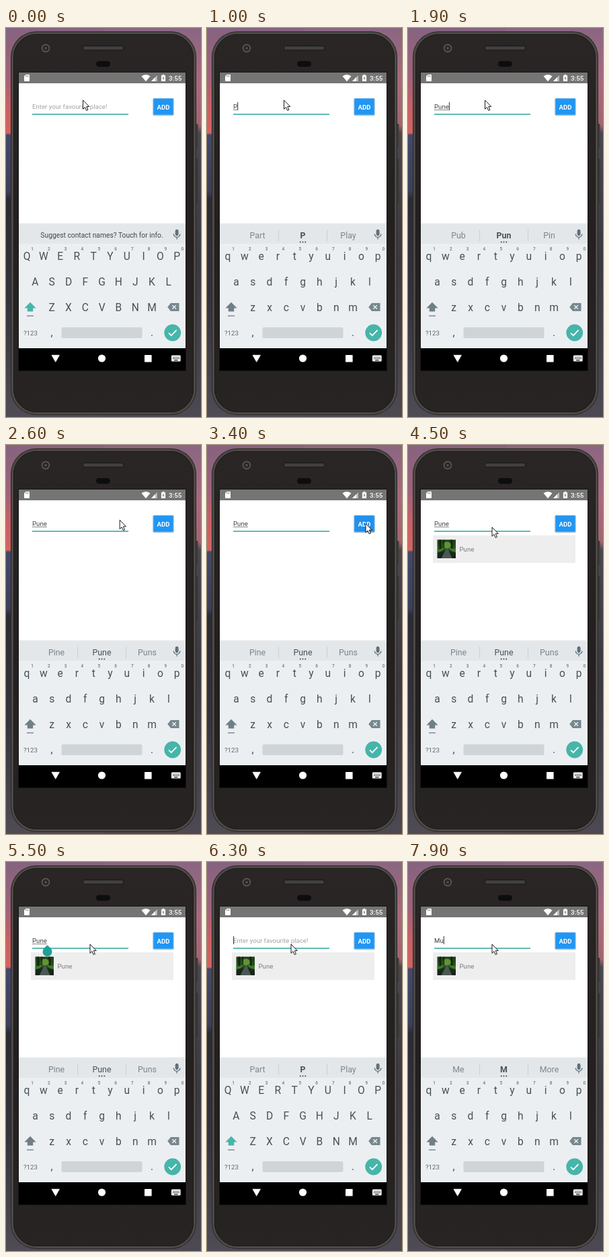
Animation of 290 by 577 pixels, one loop 8 s. Source, as an HTML page:

```html
<!DOCTYPE html>
<html lang="en">
<head>
<meta charset="utf-8">
<title>Favourite places</title>
<style>
  html, body { margin: 0; width: 100%; height: 100%; overflow: hidden; background: #2b2327; }
  svg { display: block; width: 290px; height: 577px; font-family: Roboto, sans-serif; }
  text { white-space: pre; }
  .mid { text-anchor: middle; }
  .key { font-size: 15.6px; fill: #465156; }
  .digit { font-size: 6.4px; font-weight: 500; fill: #68777e; }
  .field { font-size: 9.65px; }
  .word { font-size: 12.4px; fill: #78868c; }
  .main { fill: #465257; }
  .bold { font-weight: 700; }
</style>
</head>
<body>
<svg viewBox="0 0 290 577">
  <defs>
    <linearGradient id="skyL" x2="0" y2="1">
      <stop offset="0" stop-color="#856380"/>
      <stop offset=".12" stop-color="#a0627a"/>
      <stop offset=".2" stop-color="#c95f66"/>
      <stop offset=".27" stop-color="#d4635f"/>
      <stop offset=".275" stop-color="#44486a"/>
      <stop offset=".42" stop-color="#3b3f58"/>
      <stop offset=".44" stop-color="#2c2b34"/>
      <stop offset=".7" stop-color="#34333d"/>
      <stop offset="1" stop-color="#504c56"/>
    </linearGradient>
    <linearGradient id="skyR" x2="0" y2="1">
      <stop offset="0" stop-color="#8a6681"/>
      <stop offset=".14" stop-color="#a86a7e"/>
      <stop offset=".25" stop-color="#a3656f"/>
      <stop offset=".27" stop-color="#4a4750"/>
      <stop offset=".6" stop-color="#3a3841"/>
      <stop offset="1" stop-color="#4c4953"/>
    </linearGradient>
    <linearGradient id="body" x2="0" y2="1">
      <stop offset="0" stop-color="#2a2625"/>
      <stop offset=".5" stop-color="#242020"/>
      <stop offset="1" stop-color="#272423"/>
    </linearGradient>
    <linearGradient id="leaf" x2="0" y2="1">
      <stop offset="0" stop-color="#1d3a18"/>
      <stop offset=".5" stop-color="#2a5a22"/>
      <stop offset=".65" stop-color="#1a2a1c"/>
      <stop offset="1" stop-color="#172019"/>
    </linearGradient>
    <linearGradient id="shade" x2="0" y2="1">
      <stop offset="0" stop-color="#000" stop-opacity="0"/>
      <stop offset="1" stop-color="#000" stop-opacity=".12"/>
    </linearGradient>
  </defs>

  <!-- wallpaper -->
  <path fill="url(#skyL)" d="M0 0H145V577H0z"/>
  <path fill="url(#skyR)" d="M145 0H290V577H145z"/>

  <!-- phone -->
  <rect x="281" y="142" width="4.5" height="36" rx="1.5" fill="#3f3c3a"/>
  <rect x="281" y="194" width="4.5" height="66" rx="1.5" fill="#3a3735"/>
  <rect x="7" y="5" width="276" height="569" rx="38" fill="#2b2927"/>
  <rect x="9.5" y="7.5" width="271" height="564" rx="36" fill="url(#body)" stroke="#4d4a46" stroke-width="3"/>
  <rect x="11.5" y="9.5" width="267" height="560" rx="34" fill="none" stroke="#1d1b1b"/>
  <circle cx="59" cy="30" r="5.4" fill="#262626" stroke="#5c5b5a" stroke-width="1.6"/>
  <circle cx="59" cy="30" r="2" fill="#4d4c4c"/>
  <rect x="114" y="26.5" width="61" height="6.5" rx="3.2" fill="#3c3b3a" stroke="#171717"/>
  <path d="M117 29.8H172" stroke="#5b5a59" stroke-dasharray="1 1"/>
  <rect x="134" y="49" width="21" height="8.5" rx="4.2" fill="#0d0d0d"/>
  <rect x="18" y="65" width="250" height="444" fill="#161414"/>
  <path fill="#fff" d="M19 82H267V292H19z"/>

  <!-- status bar -->
  <path fill="#757575" d="M19 66H267V82H19z"/>
  <g fill="#fff">
    <path d="M29.6 69H34.2Q35 69 35 69.8V78.2Q35 79 34.2 79H27.8Q27 79 27 78.2V71.6z"/>
    <path d="M29.6 70.4v2M31.3 70.4v2M33 70.4v2" stroke="#757575" stroke-width=".9"/>
    <path d="M201.5 71.6Q208 66.8 214.5 71.6L208 79.3z"/>
    <path d="M216 79L225 70V79z" opacity=".5"/>
    <path d="M216 79L222 73V79z"/>
    <path d="M232.8 69h2.4v1.2h1.9V79h-6.2v-8.8h1.9z"/>
    <path d="M234.6 71.5l-2.2 3.5h1.4l-.4 2.8 2.2-3.6h-1.4z" fill="#757575"/>
    <text x="242" y="77.6" font-size="9.8" font-weight="500">3:55</text>
  </g>

  <!-- list item -->
  <g id="item">
    <path fill="#eee" d="M37 134H249V175H37z"/>
    <g transform="translate(43.5 140.5)">
      <path fill="url(#leaf)" d="M0 0H27.5V27.5H0z"/>
      <ellipse cx="14.5" cy="8" rx="6" ry="5" fill="#6fa53c" opacity=".8"/>
      <path fill="#14240f" d="M3 0h2.5l.5 15H3zM9 0h1.5v12H9zM20 0h2.5l1 15h-3z"/>
      <path fill="#43882c" d="M0 15L11 12 7 17 0 19zM27.5 14L17 12 21 17 27.5 19z" opacity=".8"/>
      <path fill="#4b5853" d="M13 14h3L22 27.5H6z"/>
    </g>
    <text class="field" x="76.5" y="158.2" fill="#7d7d7d">Pune</text>
  </g>

  <!-- input -->
  <text class="field" id="hint" x="39" y="119.9" fill="#a3a3a3">Enter your favourite place!</text>
  <text class="field" id="typed" x="39" y="119.9" fill="#444"></text>
  <path id="under" stroke="#666" stroke-width=".8"/>
  <path d="M39 128H182" stroke="#2ba69a" stroke-width="1.5"/>
  <path id="caret" d="M0 110V122" stroke="#333" stroke-width="1"/>
  <path id="handle" d="M61.5 123.2L66.4 128.1A7 7 0 1 1 56.6 128.1z" fill="#1fa096"/>

  <!-- button -->
  <rect id="lift" x="218.3" y="104.6" width="31.4" height="25.6" rx="1.6" fill="#000"/>
  <rect x="219" y="104.5" width="30" height="24.5" rx="1.2" fill="#2196f3" stroke="#7fbdf0" stroke-width="1"/>
  <rect id="press" x="219" y="104.5" width="30" height="24.5" rx="1.2" fill="#0b3d91"/>
  <text class="mid bold" x="234" y="120.5" font-size="9.6" fill="#fff">ADD</text>

  <!-- keyboard -->
  <path fill="url(#shade)" d="M19 288.5H267V291.5H19z"/>
  <path fill="#eceff1" d="M19 291H267V475H19z"/>
  <path fill="#e4e7ea" d="M19 291H267V320H19z"/>
  <text class="mid" id="tip" x="142.5" y="310.6" font-size="10.3" fill="#3b484e">Suggest contact names? Touch for info.</text>
  <g id="words">
    <path d="M106.5 299V316M178.5 299V316" stroke="#ccd1d4"/>
    <text class="mid word" x="75" y="311.6"></text>
    <text class="mid word main" x="142.5" y="311.6"></text>
    <text class="mid word" x="210" y="311.6"></text>
    <g fill="#3b484e"><circle cx="138.7" cy="317.6" r="1"/><circle cx="142.5" cy="317.6" r="1"/><circle cx="146.3" cy="317.6" r="1"/></g>
  </g>
  <g fill="none" stroke="#5f7079" stroke-width="1.3">
    <rect x="252.3" y="299.5" width="3.6" height="8" rx="1.8" fill="#5f7079"/>
    <path d="M249.3 305.5a4.8 4.8 0 0 0 9.6 0M254.1 310.5V313.5"/>
  </g>
  <g id="keys"></g>
  <path id="shift" d="M36 406.8L44.6 415.4H40.2V420.6H31.8V415.4H27.4z"/>
  <path d="M31 427H41" stroke="#6d7d85" stroke-width="1.3"/>
  <path d="M245 408H257.5V420H245L240.2 414z" fill="#77878e"/>
  <path d="M247.3 411.2l5.6 5.6m0-5.6l-5.6 5.6" stroke="#eceff1" stroke-width="1.4"/>
  <text x="26" y="455.6" font-size="9.7" fill="#5b6a71">?123</text>
  <text class="mid key" x="68" y="457">,</text>
  <text class="mid key" x="217" y="457">.</text>
  <rect x="82.5" y="444" width="120" height="16" rx="2" fill="#cfd4d7"/>
  <circle cx="247.7" cy="452" r="12.4" fill="#46b5aa"/>
  <path d="M242 452.4l3.8 3.8 7.8-8" fill="none" stroke="#fff" stroke-width="1.7"/>

  <!-- navigation bar -->
  <path d="M19 475H267V508H19z"/>
  <g fill="#fff">
    <path d="M68 485.3H79.4L73.7 495.3z" stroke="#fff" stroke-linejoin="round" stroke-width=".8"/>
    <circle cx="142.5" cy="490" r="5.6"/>
    <rect x="206" y="485" width="10.6" height="10.6" rx=".6"/>
    <rect x="246" y="485.6" width="13.6" height="9" rx="1.2"/>
  </g>
  <path d="M248 488.2H258M248 490.4H258" stroke="#000" stroke-width="1.1" stroke-dasharray="1.2 .95"/>
  <path d="M250 492.8H255.6" stroke="#000" stroke-width="1.1"/>

  <path id="mouse" d="M.5 .5V13.8L3.5 11 5.7 15.9 7.9 14.9 5.8 10.1H9.8z" fill="#fff" stroke="#000" stroke-width=".9"/>
</svg>
<script>
const LOOP = 8000, TICK = 100;
const $ = id => document.getElementById(id);

const rows = [
  { keys: 'QWERTYUIOP', x: 31, y: 344.2 },
  { keys: 'ASDFGHJKL', x: 43.4, y: 382.2 },
  { keys: 'ZXCVBNM', x: 68.2, y: 420 }
];
const PITCH = 24.8;
$('keys').innerHTML = rows.map((row, r) => [...row.keys].map((k, i) => {
  const x = row.x + i * PITCH;
  const digit = r ? '' : `<text class="mid digit" x="${x + 8}" y="330.4">${(i + 1) % 10}</text>`;
  return `<text class="mid key letter" x="${x}" y="${row.y}">${k}</text>${digit}`;
}).join('')).join('');
const letters = [...document.querySelectorAll('.letter')];
const wordTexts = [...$('words').querySelectorAll('text')];

// Each track is a list of [start time, value]; a value holds until the next.
const typed = [[0, ''], [900, 'P'], [1300, 'Pu'], [1500, 'Pun'], [1800, 'Pune'],
  [5900, 'Pun'], [6000, 'Pu'], [6100, 'P'], [6200, ''], [7200, 'M'], [7900, 'Mu']];
const composing = [[0, 0], [1000, 1], [1300, 0], [1400, 1], [1500, 0], [1600, 1],
  [1800, 0], [1900, 1], [5900, 0], [7300, 1], [7900, 0]];
const caretOn = [[0, 0], [600, 1], [2300, 0], [2800, 1], [3400, 0], [4000, 1],
  [4500, 0], [5000, 1], [5500, 0], [5900, 1], [6900, 0], [7200, 1], [7800, 0], [7900, 1]];
const upper = [[0, 1], [1000, 0], [6300, 1], [7300, 0]];
const words = [[0, ''], [1000, 'Part P Play'], [1400, 'Put Pu Purchase'], [1600, 'Pub Pun Pin'],
  [2000, 'Pine Pune Puns'], [6000, 'Pub Pun Pin'], [6100, 'Put Pu Purchase'],
  [6200, 'Part P Play'], [7300, 'Me M More']];
const item = [[0, 0], [3600, 1]];
const handle = [[0, 0], [5000, .35], [5100, .7], [5200, 1], [5900, 0]];
const press = [[0, 0], [3400, .06], [3500, .14], [3700, .1], [3800, .06], [4000, .03], [4200, 0]];

// Pointer stops: [time, x, y]
const path = [[0, 114, 106.5], [2250, 114, 106.5], [3000, 235.5, 116], [3550, 235.5, 116],
  [3900, 130, 129.5], [4200, 124.5, 126], [4500, 124.5, 121.5], [LOOP, 124.5, 121.5]];

const at = (track, t) => track.filter(s => s[0] <= t).pop()[1];
const ease = p => p * p * (3 - 2 * p);
const show = (el, on) => { el.style.display = on ? '' : 'none'; };

function pointer(t) {
  const i = path.findIndex((s, n) => n && t <= s[0]);
  const [t0, x0, y0] = path[i - 1], [t1, x1, y1] = path[i];
  const p = ease((t - t0) / (t1 - t0));
  return [x0 + (x1 - x0) * p, y0 + (y1 - y0) * p];
}

function draw(t) {
  const text = at(typed, t), caps = at(upper, t), list = at(words, t);
  $('typed').textContent = text;
  show($('hint'), !text);
  const end = 39 + (text ? $('typed').getComputedTextLength() : 0);
  show($('under'), text && at(composing, t));
  $('under').setAttribute('d', `M39 121.6H${end}`);
  show($('caret'), at(caretOn, t));
  $('caret').setAttribute('transform', `translate(${end + .6})`);

  show($('tip'), !list);
  show($('words'), list);
  const parts = list ? list.split(' ') : ['', '', ''];
  wordTexts.forEach((el, i) => { el.textContent = parts[i]; });
  wordTexts[1].classList.toggle('bold', parts[1] !== 'Pune');

  letters.forEach(el => {
    const c = el.textContent;
    el.textContent = caps ? c.toUpperCase() : c.toLowerCase();
  });
  $('shift').setAttribute('fill', caps ? '#46b5aa' : '#6f7f86');

  show($('item'), at(item, t));
  $('handle').setAttribute('opacity', at(handle, t));
  const force = at(press, t);
  $('press').setAttribute('opacity', force);
  $('lift').setAttribute('opacity', .2 + force);
  $('mouse').setAttribute('transform', `translate(${pointer(t)})`);
}

const start = performance.now();
let last = -1;
function frame() {
  const t = Math.floor(((performance.now() - start) % LOOP) / TICK) * TICK;
  if (t !== last) draw(last = t);
  requestAnimationFrame(frame);
}
frame();
</script>
</body>
</html>
```
